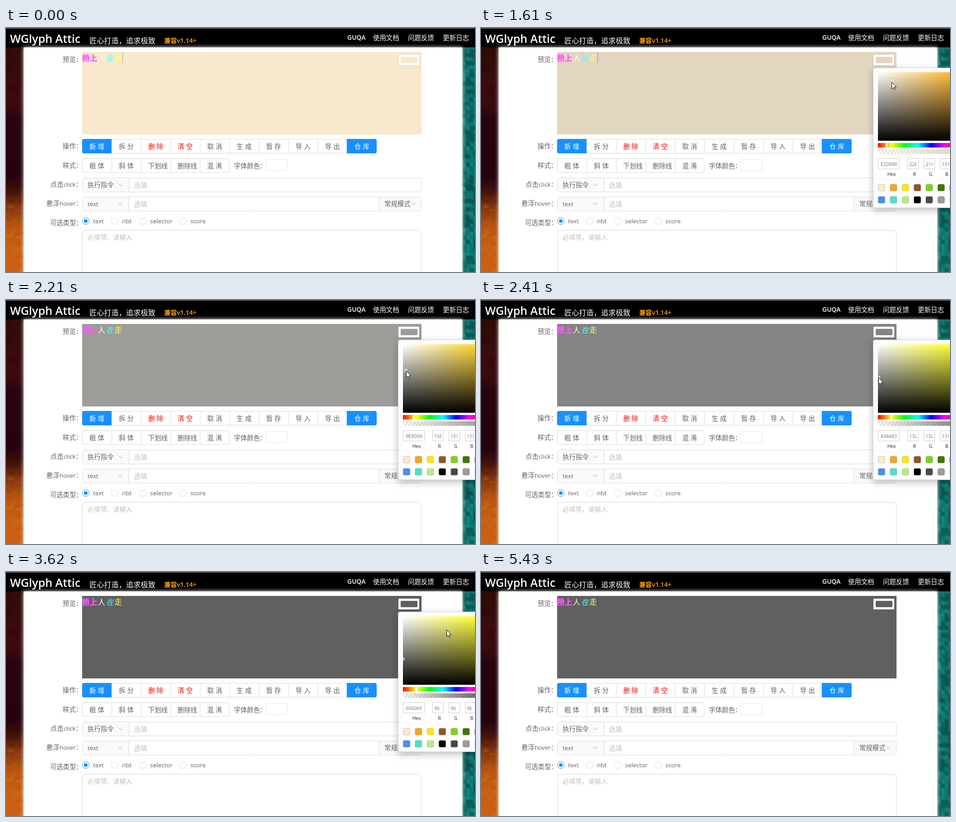
Recreate the animation shown at these times as an HTML page with a canvas. Size 1035 by 541 pixels, loop 5.63 s.

```html
<!DOCTYPE html>
<html lang="zh-CN">
<head>
<meta charset="utf-8">
<title>Text editor</title>
<style>
html, body { margin: 0; width: 100%; height: 100%; overflow: hidden; background: #fff; }
canvas { display: block; width: 1035px; height: 541px; }
</style>
</head>
<body>
<canvas id="stage" width="1035" height="541"></canvas>
<script>
const W = 1035, H = 541, LOOP = 5630;
const FONT = '"Open Sans", "Noto Sans CJK SC", "Noto Sans CJK", sans-serif';
const INK = '#616161', LINE = '#d9d9d9', HINT = '#bfbfbf', BLUE = '#1890ff';
const stage = document.getElementById('stage').getContext('2d');
let g = stage;

// start time, cursor x, y (null = hidden), colour, hue, picker open, caret on
const CREAM = [248, 233, 204], GREY = [96, 96, 96];
const steps = [
  [0, null, 0, CREAM, 39.5, 0, 1],
  [200, 950, 15, CREAM, 39.5, 0, 0],
  [400, 905, 58, CREAM, 39.5, 0, 0],
  [600, 889, 77, CREAM, 39.5, 1, 1],
  [800, 889, 77, CREAM, 39.5, 1, 1],
  [1010, 903, 95, CREAM, 39.5, 1, 1],
  [1210, 911, 102, CREAM, 39.5, 1, 0],
  [1410, 910, 108, [241, 227, 200], 39.5, 1, 0],
  [1610, 906, 120, [226, 214, 191], 39.5, 1, 1],
  [1810, 899, 144, [205, 195, 176], 39.5, 1, 1],
  [2010, 883, 157, [179, 172, 158], 40, 1, 1],
  [2210, 883, 157, [158, 157, 153], 48, 1, 0],
  [2410, 877, 172, [132, 132, 131], 60, 1, 0],
  [2610, 871, 187, [109, 109, 109], 60, 1, 0],
  [2820, 871, 192, GREY, 60, 1, 1],
  [3020, 871, 190, GREY, 60, 1, 1],
  [3420, 905, 165, GREY, 60, 1, 0],
  [3620, 972, 128, GREY, 60, 1, 0],
  [3820, 1012, 105, GREY, 60, 1, 1],
  [4220, 985, 86, GREY, 60, 1, 1],
  [4420, 946, 68, GREY, 60, 1, 0],
  [4620, 927, 61, GREY, 60, 1, 0],
  [4820, 927, 61, GREY, 60, 1, 1],
  [5030, 936, 30, GREY, 60, 0, 1],
  [5230, null, 0, GREY, 60, 0, 0],
  [5430, null, 0, GREY, 60, 0, 1]
];

function rect(x, y, w, h, fill) {
  g.fillStyle = fill;
  g.fillRect(x, y, w, h);
}

function round(x, y, w, h, r, fill) {
  g.beginPath();
  g.roundRect(x, y, w, h, r);
  g.fillStyle = fill;
  g.fill();
}

function box(x, y, w, h, r, fill, line) {
  round(x + .5, y + .5, w - 1, h - 1, r, fill);
  g.strokeStyle = line;
  g.lineWidth = 1;
  g.stroke();
}

function text(s, x, y, size = 14.4, color = INK, style = '400', align = 'left') {
  g.font = `${style} ${size}px ${FONT}`;
  g.textAlign = align;
  g.fillStyle = color;
  g.fillText(s, x, y);
}

// Latin letters run a little smaller than the Chinese ones
const latin = (s, x, y, color = INK) => text(s, x, y, 13.4, color);

function circle(x, y, r, fill, line, width = 1) {
  g.beginPath();
  g.arc(x, y, r, 0, 7);
  if (fill) { g.fillStyle = fill; g.fill(); }
  if (line) { g.strokeStyle = line; g.lineWidth = width; g.stroke(); }
}

function gradient(x0, y0, x1, y1, colors) {
  const grad = g.createLinearGradient(x0, y0, x1, y1);
  colors.forEach((c, i) => {
    const [color, at] = Array.isArray(c) ? c : [c, i / (colors.length - 1)];
    grad.addColorStop(at, color);
  });
  return grad;
}

function chevron(x, y) {
  g.beginPath();
  g.moveTo(x - 5, y - 3);
  g.lineTo(x, y + 3);
  g.lineTo(x + 5, y - 3);
  g.strokeStyle = '#b5b5b5';
  g.lineWidth = 1.1;
  g.stroke();
}

function random(seed) {
  return () => (seed = seed * 16807 % 2147483647) / 2147483647;
}

function backdrop() {
  const rnd = random(4721);
  rect(0, 43, 50, 498, gradient(0, 43, 0, 541, [
    ['#300b07', 0], ['#340c0a', .12], ['#3d0b0f', .16], ['#390a0f', .28],
    ['#280310', .31], ['#26020f', .58], ['#42120a', .64], ['#83350d', .71],
    ['#b85711', .8], ['#c86213', .9], ['#cc6012', 1]]));
  g.filter = 'blur(1px)';
  for (let i = 0; i < 120; i++) {
    const y = 43 + rnd() * 498, hot = y > 385;
    if (y > 190 && y < 360) continue;
    const tone = hot ? (rnd() < .5 ? '255,150,30' : '140,40,0') : (rnd() < .5 ? '90,20,16' : '10,0,0');
    rect(rnd() * 40 - 4, y, 4 + rnd() * 10, 3 + rnd() * 4, `rgba(${tone},.14)`);
  }
  rect(1000, 43, 35, 498, '#0c6a63');
  const teal = ['#0b5c57', '#0e756c', '#13857a', '#0a5352', '#107871', '#0b645f'];
  for (let y = 36; y < 550; y += 9) {
    for (let x = 1000; x < 1040; x += 8) {
      g.beginPath();
      g.moveTo(x, y);
      g.lineTo(x + 9, y + 4);
      g.lineTo(x + 8, y + 14);
      g.lineTo(x - 1, y + 9);
      g.fillStyle = teal[rnd() * 6 | 0];
      g.fill();
    }
  }
  g.filter = 'none';
  rect(0, 0, W, 43, '#000');
  rect(0, 0, W, 1, '#888');
  g.shadowColor = '#fff';
  g.shadowBlur = 8;
  rect(39, 43, 968, 520, '#fff');
  g.shadowBlur = 0;
}

function header() {
  text('WGlyph Attic', 9, 33, 25, '#fff', '600');
  text('匠心打造，追求极致', 184, 34, 16.2, '#fff');
  text('兼容v1.14+', 349, 33, 14, '#ffa500', '600');
  text('GUQA', 753, 26, 14, '#fff', '600');
  ['使用文档', '问题反馈', '更新日志'].forEach((s, i) => text(s, 810 + i * 77, 27, 14.4, '#fff'));
}

function buttons(names, y) {
  const step = 64.95, n = names.length;
  box(168, y, Math.round(n * step), 32, 4, '#fff', LINE);
  names.forEach((name, i) => {
    const x = Math.round(168 + i * step), end = Math.round(168 + (i + 1) * step);
    const main = name === '新增' || name === '仓库';
    if (main) {
      // a later button overlaps its neighbour's border by one pixel
      const left = i ? x - 1 : x;
      round(left, y, end - left, 32, i ? [0, 4, 4, 0] : [4, 0, 0, 4], BLUE);
    } else if (i && names[i - 1] !== '新增') {
      rect(x, y, 1, 32, LINE);
    }
    const color = main ? '#fff' : name === '删除' || name === '清空' ? '#f00' : INK;
    if (name.length === 2) {
      text(name[0], x + 16, y + 21.5, 14.4, color);
      text(name[1], x + 34.5, y + 21.5, 14.4, color);
    } else {
      text(name, x + 15.5, y + 21.5, 14.4, color);
    }
  });
}

// white frame with a faint ring, around a patch of colour
function swatch(x, y, color) {
  round(x - 1, y - 1, 48, 26, 2, 'rgba(0,0,0,.1)');
  round(x, y, 46, 24, 1, '#fff');
  round(x + 5, y + 5, 37, 14, 2, color);
}

function field(y, choice) {
  box(168, y, 749, 32, 4, '#fff', LINE);
  round(169, y + 1, 102, 30, [3, 0, 0, 3], '#fafafa');
  rect(271, y, 1, 32, LINE);
  if (choice === 'text') latin(choice, 180, y + 21);
  else text(choice, 180, y + 20.5);
  chevron(252.5, y + 15.5);
  text('选填', 282.5, y + 22, 14.4, HINT);
}

function mixedLabel(word, event, x, y) {
  text(word, x, y);
  latin(event, x + 29, y);
  text('：', 153.8, y);
}

function form() {
  text('预览：', 125, 75);
  text('操作：', 125, 267);
  text('样式：', 125, 310);
  mixedLabel('点击', 'click', 98, 352);
  mixedLabel('悬浮', 'hover', 89, 394);
  text('可选类型：', 97, 437);

  buttons(['新增', '拆分', '删除', '清空', '取消', '生成', '暂存', '导入', '导出', '仓库'], 246);
  buttons(['粗体', '斜体', '下划线', '删除线', '混淆'], 289);
  text('字体颜色：', 503, 310.5);
  swatch(574, 292, '#fff');

  field(332, '执行指令');
  field(374, 'text');
  round(824, 375, 92, 30, [0, 3, 3, 0], '#fafafa');
  rect(823, 374, 1, 32, LINE);
  text('常规模式', 835, 394.5);
  chevron(899, 389.5);

  [['text', 176], ['nbt', 240], ['selector', 302], ['score', 391]].forEach(([s, x], i) => {
    circle(x, 428, 7.5, '#fff', i ? LINE : BLUE);
    if (!i) circle(x, 428, 4, BLUE);
    latin(s, x + 16, 433);
  });
  box(168, 448, 749, 110, 4, '#fff', LINE);
  text('必填项，请输入', 179.5, 469, 14.2, HINT);
}

function preview(color, caret) {
  rect(168, 53, 749, 183, color);
  text('桥上', 168, 72.5, 16.5, '#f5f', '700');
  g.strokeStyle = '#f5f';
  g.lineWidth = .6;
  g.strokeText('桥上', 168, 72.5);
  text('人', 202.5, 72.5, 16.5, '#fff');
  text('在', 221, 72.5, 16.5, '#5ff', 'italic 400');
  text('走', 239.5, 72.5, 16.5, '#ff5');
  if (caret) rect(257, 54, 1, 23, 'rgba(0,0,0,.32)');
  swatch(866, 59, color);
}

function input(s, x, w, label, mid) {
  rect(x, 289, w, 24, '#ccc');
  rect(x + 1, 290, w - 2, 22, '#fff');
  g.save();
  g.beginPath();
  g.rect(x, 289, w - 5, 24);
  g.clip();
  text(s, x + (w > 30 ? 6 : 4), 305.5, 10.4, '#777');
  g.restore();
  text(label, mid, 328, 10.4, '#222', '400', 'center');
}

function picker(rgb, hue) {
  const X = 876, Y = 98, SW = 203, SH = 152, BAR = 176;
  g.save();
  g.shadowColor = 'rgba(0,0,0,.25)';
  g.shadowBlur = 16;
  g.shadowOffsetY = 5;
  box(865, 88, 226, 311, 4, '#fff', '#d4d4d4');
  g.restore();

  g.save();
  g.beginPath();
  g.rect(X, Y, SW, SH);
  g.clip();
  rect(X, Y, SW, SH, gradient(X, 0, X + SW, 0, ['#fff', `hsl(${hue},100%,50%)`]));
  rect(X, Y, SW, SH, gradient(0, Y, 0, Y + SH, ['rgba(0,0,0,0)', '#000']));
  const max = Math.max(...rgb), min = Math.min(...rgb);
  const dx = X + (max - min) / max * SW, dy = Y + (1 - max / 255) * SH;
  circle(dx, dy, 3.7, null, 'rgba(0,0,0,.35)');
  circle(dx, dy, 2.8, null, '#fff', 1.5);
  g.restore();

  rect(X, 255, BAR, 10, gradient(X, 0, X + BAR, 0, ['#f00', '#ff0', '#0f0', '#0ff', '#00f', '#f0f', '#f00']));
  box(X + hue / 360 * BAR - 2, 255.5, 4, 9, 1, '#fff', 'rgba(255,255,255,.9)');

  rect(X, 269, BAR, 10, '#fff');
  for (let i = 0; i < 44; i++) rect(X + (i >> 1) * 8 + (i & 1) * 4, 269 + (i & 1) * 5, 4, 5, '#e6e6e6');
  const c = rgb.join();
  rect(X, 269, BAR, 10, gradient(X, 0, X + BAR, 0, [`rgba(${c},0)`, `rgb(${c})`]));

  const hex = rgb.map(v => v.toString(16).padStart(2, '0')).join('').toUpperCase();
  input(hex, 876, 48, 'Hex', 906);
  rgb.forEach((v, i) => input(String(v), 941 + i * 36, 25, 'RGB'[i], 956.5 + i * 35.7));

  rect(866, 335, 200, 1, '#eee');
  const presets = ['#f8e9cc', '#f5a623', '#f8e71c', '#8b572a', '#7ed321', '#417505', '#bd10e0',
    '#4a90e2', '#50e3c2', '#b8e986', '#000', '#4a4a4a', '#9b9b9b', '#fff'];
  presets.forEach((s, i) => box(876 + i % 7 * 26.3, i < 7 ? 346 : 373, 16, 16, 3, s, 'rgba(0,0,0,.18)'));
}

function cursor(x, y) {
  const path = [[0, 0], [0, 14.5], [3.3, 11.4], [5.6, 16.5], [7.8, 15.5], [5.6, 10.5], [10, 10.3]];
  g.beginPath();
  path.forEach(([px, py]) => g.lineTo(x + .5 + px, y + .5 + py));
  g.closePath();
  g.fillStyle = '#fff';
  g.fill();
  g.strokeStyle = '#000';
  g.lineWidth = 1;
  g.stroke();
}

const page = document.createElement('canvas');
page.width = W;
page.height = H;
g = page.getContext('2d');
backdrop();
header();
form();
g = stage;

function frame(now) {
  const t = now % LOOP;
  const [, x, y, rgb, hue, open, caret] = steps.findLast(s => s[0] <= t);
  g.drawImage(page, 0, 0);
  preview(`rgb(${rgb})`, caret);
  if (open) picker(rgb, hue);
  if (x !== null) cursor(x, y);
}

const start = performance.now();
function tick() {
  frame(performance.now() - start);
  requestAnimationFrame(tick);
}
tick();
</script>
</body>
</html>
```
